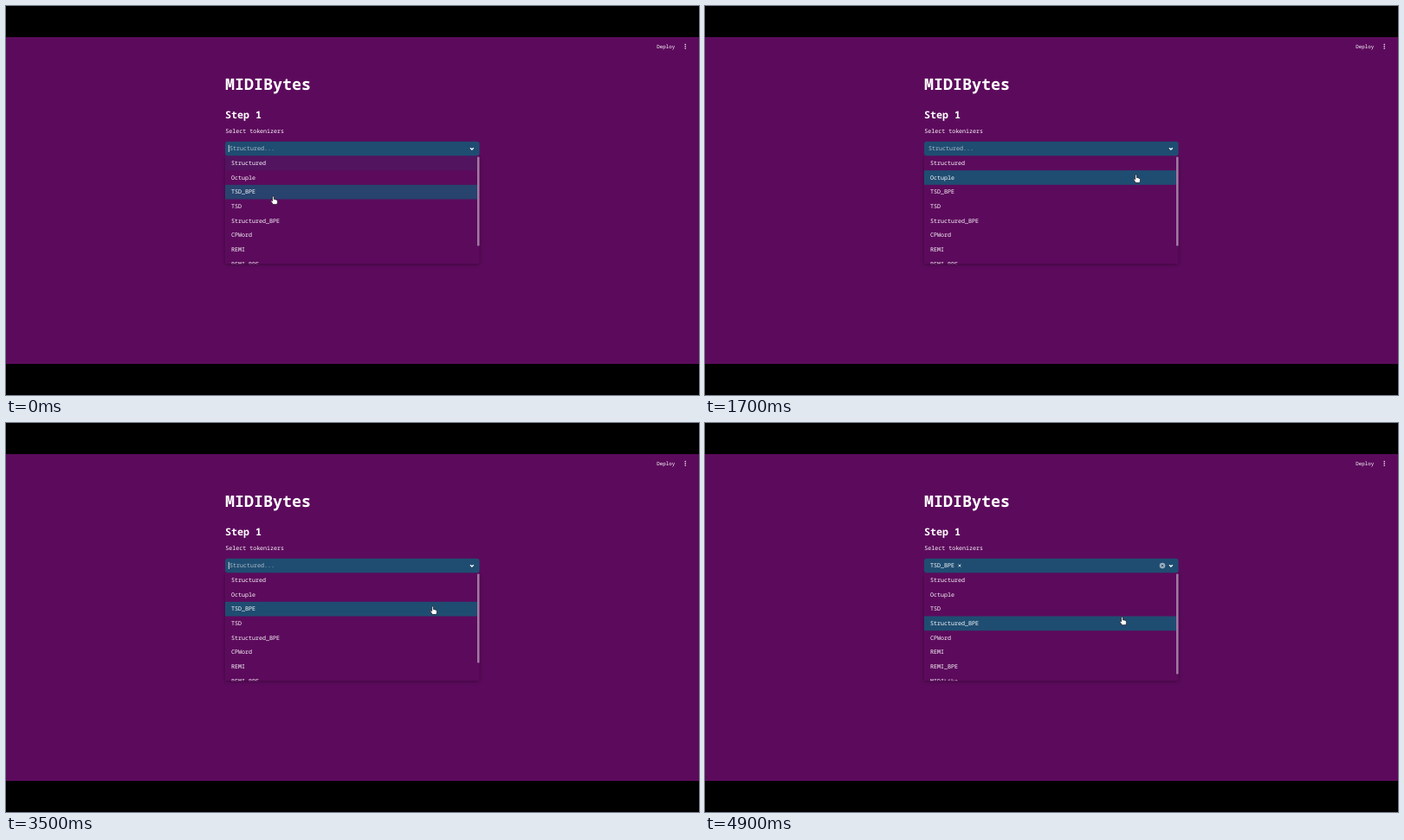
Recreate the animation shown at these times as an HTML page. Size 800 px wide and 450 px high, loop 5000 ms.

```html
<!DOCTYPE html>
<html lang="en">
<head>
<meta charset="utf-8">
<title>MIDIBytes</title>
<style>
  html, body { margin: 0; width: 100%; height: 100%; overflow: hidden; background: #000; }
  svg { display: block; width: 100vw; height: 100vh; }
  text {
    font-family: "Noto Sans Mono", "DejaVu Sans Mono", monospace;
    font-size: 6.667px; font-weight: 500; fill: #fff;
    text-rendering: geometricPrecision; white-space: pre;
  }
  .title { font-size: 18.33px; font-weight: 700; }
  .step { font-size: 11.67px; font-weight: 600; }
  .bar { font-size: 5.833px; }
  .hint { fill: #b3c0cd; font-weight: 400; }
  .status text { fill: #27204c; }
</style>
</head>
<body>
<svg viewBox="0 0 800 450" xmlns="http://www.w3.org/2000/svg">
  <defs>
    <clipPath id="menuClip"><rect x="253" y="173" width="293.6" height="125.2"/></clipPath>
    <filter id="soft" x="-10%" y="-20%" width="120%" height="140%"><feGaussianBlur stdDeviation="2"/></filter>
  </defs>
  <rect width="800" height="450"/>
  <rect y="36" width="800" height="378" fill="#5c0b5c"/>

  <text class="bar" x="751.3" y="49">Deploy</text>
  <g fill="#fff">
    <circle cx="784.2" cy="44.6" r=".75"/>
    <circle cx="784.2" cy="46.8" r=".75"/>
    <circle cx="784.2" cy="49" r=".75"/>
  </g>
  <g id="status" class="status">
    <circle cx="675" cy="44.6" r="1" fill="#27204c"/>
    <path d="M675 45.5v3M673 46.5h4M675 48.5l-1.4 2M675 48.5l1.4 2" stroke="#27204c" stroke-width=".9" fill="none"/>
    <text class="bar" x="683.5" y="49">RUNNING</text>
    <text class="bar" x="727" y="49">Stop</text>
  </g>

  <text class="title" x="253" y="97.4">MIDIBytes</text>
  <text class="step" x="253" y="130">Step 1</text>
  <text x="253.2" y="146.8">Select tokenizers</text>

  <rect x="253" y="174.5" width="293.6" height="124.5" rx="2" filter="url(#soft)" opacity=".38"/>
  <rect x="253" y="173" width="293.6" height="125.2" fill="#5c0b5c"/>
  <rect x="253" y="156.8" width="293.6" height="16.4" rx="3" fill="#1f4d71"/>
  <path d="M536 164.2l1.9 1.8 1.9-1.8" fill="none" stroke="#fff" stroke-width="1.3"/>

  <g id="empty">
    <text class="hint" x="258" y="167.2">Structured...</text>
    <rect id="caret" x="256.8" y="160.8" width=".8" height="8.2" fill="#fff"/>
  </g>
  <g id="chosen">
    <text x="260" y="167.2">TSD_BPE</text>
    <path d="M292.5 163.6l2.8 2.8m0-2.8l-2.8 2.8" stroke="#fff" stroke-width=".9"/>
    <circle cx="528" cy="165.1" r="3.3" fill="#9aadbd"/>
    <path d="M526.8 163.9l2.4 2.4m0-2.4l-2.4 2.4" stroke="#1f4d71" stroke-width=".8"/>
  </g>

  <g id="menu" clip-path="url(#menuClip)"></g>
  <rect id="thumb" x="544" y="174.4" width="2.5" rx=".8" fill="#a37aa5"/>

  <path id="hand" stroke="#17111d" stroke-width=".7" stroke-linejoin="round" fill="#fff"
    d="M-.9 .9C-.9 -.3 .9 -.3 .9 .9V3.7C1.5 3.3 2.1 3.5 2.3 4C3 3.7 3.5 4 3.7 4.5C4.5 4.3 4.9 4.8 4.9 5.6V7.2C4.9 8.2 4.3 8.6 4.2 9.5H-.3C-.6 8.3 -2 7.2 -2.6 5.9C-2.8 5.2 -1.9 4.8 -1.4 5.3L-.9 5.8Z"/>
</svg>
<script>
const LOOP = 5000, TICK = 100, CLICK = 4500, ROW = 16.67, TOP = 173.5, FADE = 200;
const options = ["Structured", "Octuple", "TSD_BPE", "TSD", "Structured_BPE", "CPWord", "REMI", "REMI_BPE", "MIDILike"];
const rest = options.filter(name => name !== "TSD_BPE");

// time, x, y of the pointer's fingertip
const path = [
  [0, 308.5, 220], [400, 497.5, 191.8], [600, 497.5, 195], [3150, 497.5, 195],
  [3400, 492.5, 212], [4500, 492.5, 212], [4700, 488.5, 212.4], [4900, 481.5, 224.2]
];
// time, highlighted row
const hovers = [[-2000, 0], [-170, 2], [230, 1], [3220, 2], [4850, 3]];

const byId = id => document.getElementById(id);
const clamp = v => Math.max(0, Math.min(1, v));
const ease = u => u * u * (3 - 2 * u);
const show = (id, on) => byId(id).setAttribute("visibility", on ? "visible" : "hidden");

function add(tag, attrs) {
  const node = document.createElementNS("http://www.w3.org/2000/svg", tag);
  for (const key in attrs) node.setAttribute(key, attrs[key]);
  return byId("menu").appendChild(node);
}

const rows = options.slice(0, 8).map((_, i) => ({
  back: add("rect", { x: 253, y: TOP + i * ROW, width: 291, height: ROW, fill: "#1f4d71" }),
  label: add("text", { x: 260, y: TOP + i * ROW + 10.4 })
}));

function pointer(t) {
  const i = path.findIndex(p => p[0] > t);
  if (i < 0) return path[path.length - 1].slice(1);
  const [t0, x0, y0] = path[i - 1], [t1, x1, y1] = path[i];
  const u = ease((t - t0) / (t1 - t0));
  return [x0 + (x1 - x0) * u, y0 + (y1 - y0) * u];
}

function glow(row, t) {
  let level = 0;
  hovers.forEach(([start, target], i) => {
    if (start > t) return;
    // the last change is immediate
    const u = i === hovers.length - 1 ? 1 : clamp((t - start) / FADE);
    level += ((target === row ? 1 : 0) - level) * u;
  });
  return level;
}

function draw(time) {
  const t = Math.floor((time % LOOP) / TICK) * TICK;
  const picked = t >= CLICK;
  const names = picked ? rest : options;
  rows.forEach((row, i) => {
    row.back.setAttribute("opacity", glow(i, t));
    if (row.label.textContent !== names[i]) row.label.textContent = names[i];
  });
  show("empty", !picked);
  show("chosen", picked);
  byId("caret").setAttribute("opacity", t % 1000 < 600 ? 1 : 0);
  byId("thumb").setAttribute("height", picked ? 116.2 : 103.2);
  byId("status").setAttribute("opacity", 0.45 * clamp(1 - Math.abs(t - 4700) / 200));
  byId("hand").setAttribute("transform", `translate(${pointer(t)})`);
}

const begin = performance.now();
function loop() {
  draw(performance.now() - begin);
  requestAnimationFrame(loop);
}
loop();
</script>
</body>
</html>
```
